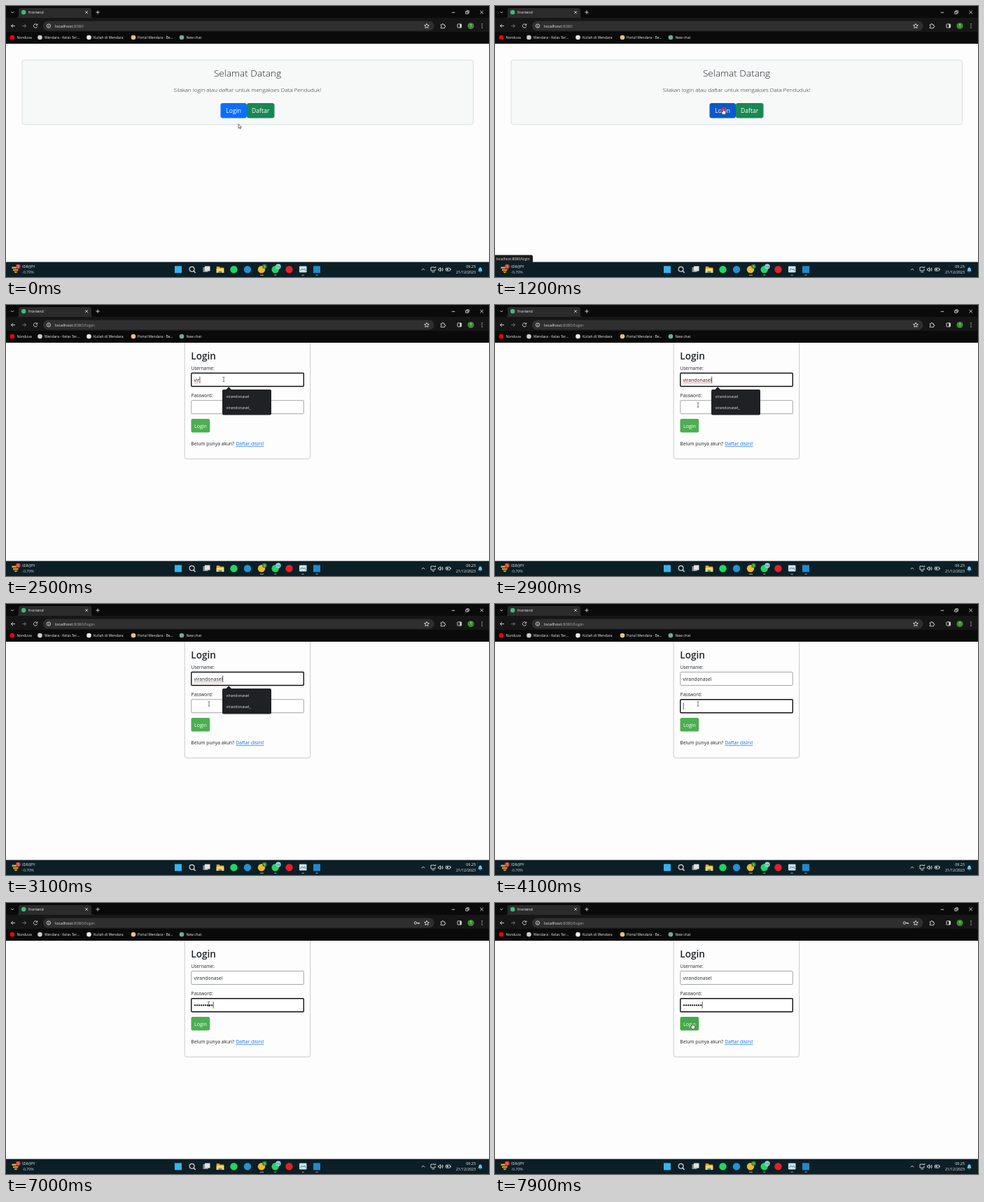
Animation of 690 by 388 pixels, one loop 8 s. Source, as an HTML page:

```html
<!DOCTYPE html>
<html lang="id">
<head>
<meta charset="utf-8">
<title>Login demo</title>
<style>
html, body { margin: 0; width: 100%; height: 100%; overflow: hidden; background: #fdfdfd }
svg { display: block; width: 100vw; height: 100vh; font-family: "Open Sans", "Noto Sans", sans-serif }
.mid { text-anchor: middle }
.end { text-anchor: end }
.line { fill: none; stroke: #ddd; stroke-width: .9 }
.form { font-size: 6.5px; fill: #212529 }
.field { fill: #fff; stroke: #8b9093; stroke-width: .8 }
.field.focus { stroke: #101010; stroke-width: 1.4 }
</style>
</head>
<body>
<svg viewBox="0 0 690 388">
  <rect width="690" height="388" fill="#fdfdfd"/>

  <g id="home">
    <rect x="23" y="77.3" width="644.5" height="92.5" rx="3.5" fill="#f7f9f9" stroke="#d3d7d9" stroke-width=".8"/>
    <g class="mid" fill="#212529" font-weight="300">
      <text x="345" y="101.2" font-size="13.6">Selamat Datang</text>
      <text x="345" y="122.8" font-size="8">Silakan login atau daftar untuk mengakses Data Penduduk!</text>
    </g>
    <rect id="homeLogin" x="306.5" y="139" width="37.5" height="21.5" rx="3.3"/>
    <rect x="344" y="139" width="39.5" height="21.5" rx="3.3" fill="#198754"/>
    <g class="mid" fill="#fff" font-size="8.6">
      <text x="325.2" y="153.2">Login</text>
      <text x="363.6" y="153.2">Daftar</text>
    </g>
  </g>

  <g id="login">
    <rect x="254.4" y="40" width="181.2" height="181.4" rx="4" fill="#eee"/>
    <rect x="255.3" y="40" width="179.2" height="180.2" rx="3.5" fill="#fdfdfd" stroke="#cfcfcf" stroke-width=".9"/>
    <g class="form">
      <text x="264.3" y="78" font-size="13.6" font-weight="600">Login</text>
      <text x="264.5" y="92.6">Username:</text>
      <text x="264.5" y="131.6">Password:</text>
      <rect id="userBox" class="field" x="264.8" y="97.5" width="160.5" height="19" rx="1"/>
      <rect id="passBox" class="field" x="264.8" y="136.7" width="160.5" height="19" rx="1"/>
      <text id="user" x="268.6" y="109.7" font-size="6.8"></text>
      <path id="squiggle" fill="none" stroke="#e0443e" stroke-width=".6"/>
      <g id="dots" fill="#111"></g>
      <path id="caret" stroke="#111" stroke-width=".7"/>
      <rect id="submit" x="264.5" y="163" width="26.7" height="19.5" rx="2"/>
      <text class="mid" x="277.9" y="175.7" font-size="7" fill="#fff">Login</text>
      <text x="264.3" y="201.4" font-size="6.75">Belum punya akun?</text>
      <text x="328.4" y="201.4" font-size="6.75" fill="#0d6efd" text-decoration="underline">Daftar disini!</text>
    </g>
    <g id="popup" font-size="5.5" fill="#e4e4e4">
      <path d="M314 121.5l4.2-4.2 4.2 4.2z" fill="#202124"/>
      <rect x="309" y="121" width="70" height="36.5" rx="2" fill="#202124"/>
      <text x="314.4" y="133">virandonasel</text>
      <text x="314.4" y="149.3">virandonasel_</text>
    </g>
  </g>

  <g id="status" font-size="5.1" fill="#e6e6e6">
    <path d="M0 356.5h52q2 0 2 2v8.5H0z" fill="#1c1c1c"/>
    <text x="1.8" y="363.6">localhost:8080/login</text>
  </g>

  <!-- browser frame -->
  <rect width="690" height="54" fill="#0a0a0a"/>
  <rect y="17" width="690" height="20" fill="#161616"/>
  <path d="M15 17q3 0 3-3V6q0-3 3-3h98q3 0 3 3v8q0 3 3 3z" fill="#2b2b2b"/>
  <rect x="53" y="21.5" width="558.5" height="14" rx="7" fill="#2f2f2f"/>
  <circle cx="25.2" cy="9" r="3.2" fill="#41b883"/>
  <g fill="#eee">
    <text x="32" y="11" font-size="5.35">frontend</text>
    <text x="70" y="30.8" font-size="6.05">localhost<tspan fill="#a8a8a8">:8080<tspan id="path"></tspan></tspan></text>
    <g id="bookmarks" font-size="5.03"></g>
  </g>
  <g class="line">
    <path d="M7.4 8.2l1.8 1.8 1.8-1.8M113.3 7.2l3.6 3.6m0-3.6l-3.6 3.6M128.5 9h5.2m-2.6-2.6v5.2M636.8 9.3h4.4M677.4 6.8l4.4 4.4m0-4.4l-4.4 4.4"/>
    <path d="M656.8 8h3.2v3.2h-3.2zM658 7.8v-1h3.3v3.4h-1"/>
    <path d="M13 28.5H7.5m2.5-2.6l-2.6 2.6 2.6 2.6"/>
    <path d="M23 28.5h5.5m-2.5-2.6l2.6 2.6-2.6 2.6" stroke="#777"/>
    <path d="M44.4 27a2.7 2.7 0 1 0 .3 2.2M44.8 25.4v2h-2"/>
    <circle cx="61" cy="28.5" r="2.7"/><path d="M61 28v1.9m0-3.2v.7"/>
    <path d="M601 25.2l1 2.2 2.4.2-1.8 1.6.5 2.4-2.1-1.3-2.1 1.3.5-2.4-1.8-1.6 2.4-.2z"/>
    <path d="M621.3 26.8h1.6q.1-1.5 1-1.5t1 1.5h1.6v1.5q1.4.1 1.4 1t-1.4 1v1.4h-5.2v-1.7q1.2-.2 1.2-.9t-1.2-.9z"/>
    <rect x="645" y="25.8" width="5.6" height="5.2" rx=".6"/>
    <path d="M649.4 26v5" stroke-width="2"/>
    <g id="key"><circle cx="585" cy="28.5" r="1.7"/><path d="M586.8 28.5h4m-.6 0v1.7m-1.5-1.7v1.4"/></g>
  </g>
  <circle cx="664" cy="28.5" r="4.6" fill="#3d8b2f"/>
  <text class="mid" x="664" y="30.3" font-size="4.8" fill="#fff">T</text>
  <path d="M680 25.3v1.2m0 1.4v1.2m0 1.4v1.2" stroke="#ddd" stroke-width="1.2"/>

  <!-- taskbar -->
  <rect y="366.5" width="690" height="21.5" fill="#0c1f26"/>
  <path d="M8.5 373.5h8l-1 2.5h-7zM10 377h8l-1 2h-7zM11 380h6l-3 2.5z" fill="#f2a52b"/>
  <circle cx="17.3" cy="373" r="3.3" fill="#d9433c"/>
  <g fill="#f2f2f2" font-size="5.4">
    <text class="mid" x="17.3" y="374.8" font-size="4.6">1</text>
    <text x="23" y="375.3">IDR/JPY</text>
    <text x="23" y="382.5" fill="#c3cacd">-0,70%</text>
    <text class="end" x="671" y="375.3">09.25</text>
    <text class="end" x="671" y="382.5" font-size="5.3">21/12/2023</text>
  </g>
  <g id="apps"></g>
  <g class="line">
    <circle cx="265.6" cy="376.7" r="3.4" stroke-width="1.2"/><path d="M268 379.3l2.6 2.6" stroke-width="1.4"/>
    <path d="M593.8 378.3l2.2-2.2 2.2 2.2"/>
    <path d="M612 374h-5v5h6v-2.6M608.5 381h3.5M611.5 374.5h2.3v-1.6"/>
    <path d="M617.5 376.2h1.2l1.8-1.6v5.4l-1.8-1.6h-1.2zM622 375.8q1 1.5 0 3m1.3-4q1.8 2.5 0 5"/>
    <rect x="628.3" y="375.2" width="6.2" height="4" rx=".8"/><path d="M629.5 377.2h2.3" stroke-width="2"/><path d="M635.4 376.4v1.6"/>
  </g>
  <rect x="281.5" y="374" width="7" height="7" fill="#8b9196"/>
  <rect x="284" y="372.5" width="7.5" height="7" fill="#dfe3e5"/>
  <path d="M300.7 373h4l1.2 1.4h5.4v7.6h-10.6z" fill="#e3a321"/>
  <path d="M300.7 376h10.6v6h-10.6z" fill="#ffd664"/>
  <path d="M303.5 379.5h5v2.5h-5z" fill="#3d8fd6"/>
  <rect x="419" y="372.5" width="10.5" height="9" rx="1" fill="#cfe4ee"/>
  <path d="M420.5 379l2.3-3 2 2 1.5-2 2 3.2" fill="none" stroke="#3f7fa6"/>
  <circle cx="369.3" cy="373" r="3.2" fill="#3d8b2f"/>
  <circle cx="389" cy="373" r="3.7" fill="#8fd6df"/>
  <g class="mid" font-size="4.2">
    <text x="369.3" y="374.6" fill="#fff">T</text>
    <text x="389" y="374.6" fill="#102a30">15</text>
  </g>
  <path d="M363 385.3h5M383.3 385.3h3M422.7 385.3h3M442.6 385.3h3" stroke="#9fb0b6" stroke-width="1"/>
  <path d="M674.3 379.8q1-.8 1-3 0-2.5 2.2-2.5t2.2 2.5q0 2.2 1 3zM676.6 380.5h1.8v.8h-1.8z" fill="#6cc5ee"/>

  <circle id="click" r="3.7" fill="#e0283c" opacity=".85"/>
  <g id="cursor" stroke-width=".6" stroke-linejoin="round">
    <path id="arrow" d="M0 0v6.2l1.5-1.4 1 2.2.9-.4-1-2.1h2z" fill="#fff" stroke="#222"/>
    <path id="hand" d="M-.7.4Q-.7-.4 0-.4T.7.4V3l2.4.5q.8.3.7 1.2L3.3 7.4q-.1.8-.9.8H0q-.6 0-1-.6L-2.7 5q-.3-.8.5-.9L-.7 5z" fill="#fff" stroke="#222"/>
    <path id="beam" d="M-1.5-3.3q1.5 0 1.5.7 0-.7 1.5-.7M0-2.6v5.2M-1.5 3.3q1.5 0 1.5-.7 0 .7 1.5.7" fill="none" stroke="#222"/>
  </g>
</svg>
<script>
const $ = id => document.getElementById(id);
const show = (id, on) => $(id).style.display = on ? '' : 'none';
const within = (v, a, b) => v >= a && v < b;

const LOOP = 8000, STEP = 100, NAME = 'virandonasel';
const PAGE = 1400, FOCUS = 2400, PASS = 3200;
const keyTimes = [4600, 4800, 4900, 5200, 5400, 5700, 5900, 6100, 6400];
const clicks = [1200, FOCUS, PASS];
// time, x, y of the pointer's hot spot
const route = [
  [0, 332, 169], [100, 332, 169], [800, 326, 147], [1300, 326, 147],
  [1700, 317, 126], [2000, 311, 106.5], [2500, 311, 106.5], [2900, 290, 143],
  [6900, 290, 143], [7600, 282, 172], [LOOP, 282, 172]
];

$('bookmarks').innerHTML = [
  [9, '#f00', 15.4, 'Nonduva'], [48.5, '#c9ced2', 55, 'Wendara - Kelas Ter...'],
  [118.5, '#e8eef2', 125, 'Kuliah di Wendara'], [182, '#e3c08a', 188, 'Portal Wendara - Be...'],
  [251, '#74aa9c', 257.5, 'New chat']
].map(([cx, color, x, label]) =>
  `<circle cx="${cx}" cy="45" r="3.3" fill="${color}"/><text x="${x}" y="46.9">${label}</text>`).join('');

$('apps').innerHTML = [
  [325.5, '#1ed760'], [345, '#2492d1'], [365, '#e8b931'], [384.7, '#25d366'], [404.5, '#e3202b']
].map(([x, color]) => `<circle cx="${x}" cy="377.3" r="5.2" fill="${color}"/>`).join('') +
  [[246, '#35b4f0'], [444, '#2489ca']].map(([x, color]) =>
    `<rect x="${x - 5}" y="372.3" width="10" height="10" fill="${color}"/>`).join('');

function pointer(t) {
  const i = route.findIndex(p => p[0] > t);
  const [t0, x0, y0] = route[i - 1], [t1, x1, y1] = route[i];
  const u = (t - t0) / (t1 - t0), k = u * u * (3 - 2 * u);
  return [x0 + (x1 - x0) * k, y0 + (y1 - y0) * k];
}

function draw(t) {
  const [x, y] = pointer(t), onLogin = t >= PAGE;
  const overHome = !onLogin && within(y, 139, 160.5);
  const overSubmit = onLogin && within(y, 163, 182.5);
  const overField = onLogin && (within(y, 97, 117) || within(y, 136, 156));

  show('home', !onLogin);
  show('login', onLogin);
  $('path').textContent = onLogin ? '/login' : '';
  $('homeLogin').setAttribute('fill', within(t, 1200, PAGE) ? '#0a58ca' : overHome ? '#0b5ed7' : '#0d6efd');
  $('submit').setAttribute('fill', overSubmit ? '#45a849' : '#4caf50');
  show('status', overHome || within(t, PAGE, 2000));
  $('status').style.opacity = Math.min(1, Math.max(0, (2000 - t) / 500));

  const inUser = within(t, FOCUS, PASS), inPass = t >= PASS;
  $('userBox').classList.toggle('focus', inUser);
  $('passBox').classList.toggle('focus', inPass);
  show('popup', inUser);
  const typed = NAME.slice(0, Math.max(0, (t - FOCUS) / STEP * 3));
  $('user').textContent = typed;
  const width = typed ? $('user').getComputedTextLength() : 0;
  show('squiggle', inUser && typed);
  $('squiggle').setAttribute('d', 'M268.6 111.6' + 'q.5 -.9 1 0t1 0'.repeat(Math.floor(width / 2)));

  const count = keyTimes.filter(k => k <= t).length;
  $('dots').innerHTML = keyTimes.slice(0, count).map((_, i) =>
    `<circle cx="${270.1 + 3 * i}" cy="146.4" r="1.15"/>`).join('');
  show('key', count);
  show('caret', inUser || inPass && !within(t, 3500, 4100));
  $('caret').setAttribute('d', inUser ? `M${269 + width} 102.5v9.5` : `M${269.2 + 3 * count} 141.3v9.7`);

  const kind = overHome || overSubmit ? 'hand' : overField ? 'beam' : 'arrow';
  for (const id of ['arrow', 'hand', 'beam']) show(id, id === kind);
  $('cursor').setAttribute('transform', `translate(${x} ${y})`);
  show('click', clicks.some(c => within(t, c, c + STEP)));
  $('click').setAttribute('transform', `translate(${x} ${y + (overHome ? 2 : 0)})`);
}

function tick() {
  draw(Math.floor(performance.now() % LOOP / STEP) * STEP);
  requestAnimationFrame(tick);
}
tick();
</script>
</body>
</html>
```
